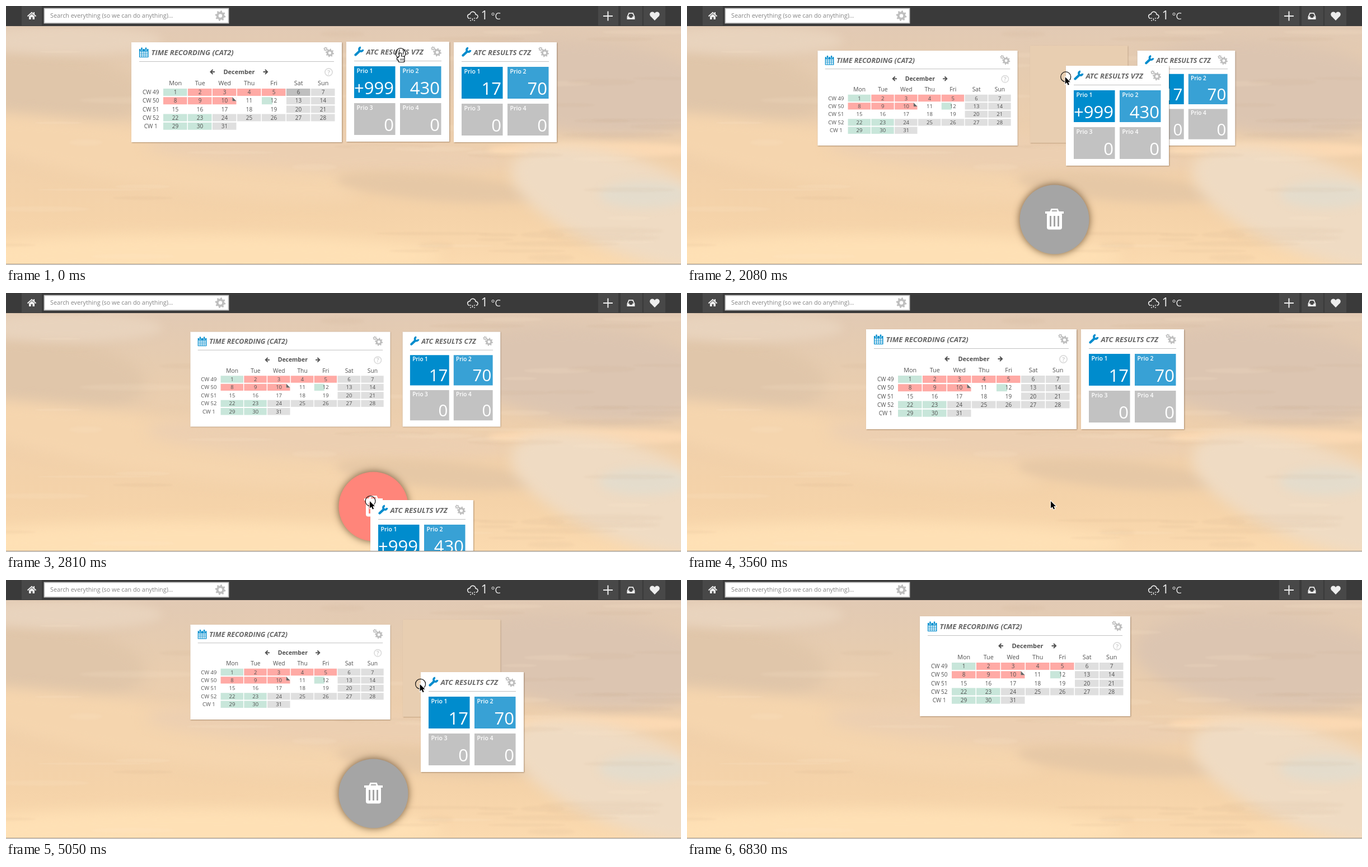
Write an HTML page with a canvas that moves like this. It is 1206 by 464 pixels and loops after 7920 ms.

```html
<!DOCTYPE html>
<html lang="en">
<head>
<meta charset="utf-8">
<title>Dashboard</title>
<style>
  html, body { margin: 0; width: 100%; height: 100%; overflow: hidden; background: #f3d2ac; }
  canvas { display: block; }
</style>
</head>
<body>
<canvas id="stage" width="1206" height="464"></canvas>
<script>
const W = 1206, H = 464, LOOP = 7920, BAR = 36, FLOOR = 462;
const CARD_Y = 65, CARD_H = 179, GAP = 8, SHRINK = 0.95;
const BLUE = '#008ccd', GREY = '#c2c2c2', LIGHT = '#eeeeee', INK = '#505050', PANEL = '#484848';
const screen = document.getElementById('stage').getContext('2d');
const backdrop = document.createElement('canvas');
backdrop.width = W;
backdrop.height = H;
let c = backdrop.getContext('2d');

// ---------- drawing helpers ----------
const times = (n, fn) => { for (let i = 0; i < n; i++) fn(i); };

function box(x, y, w, h, color, r = 0) {
  c.fillStyle = color;
  c.beginPath();
  c.roundRect(x, y, w, h, r);
  c.fill();
}

function label(str, x, y, size, color, style = '400', align = 'left') {
  c.font = `${style} ${size}px "Open Sans", "Noto Sans", sans-serif`;
  c.textAlign = align;
  c.fillStyle = color;
  c.fillText(str, x, y);
}

function trace(pts, close) {
  c.beginPath();
  for (let i = 0; i < pts.length; i += 2) c.lineTo(pts[i], pts[i + 1]);
  if (close) c.closePath();
}

function poly(color, pts) {
  trace(pts, true);
  c.fillStyle = color;
  c.fill();
}

function outline(color, width) {
  c.strokeStyle = color;
  c.lineWidth = width;
  c.stroke();
}

function line(color, width, pts) {
  trace(pts);
  outline(color, width);
}

function arc(x, y, r, from = 0, to = 7) {
  c.beginPath();
  c.arc(x, y, r, from, to);
}

function disc(x, y, r, color) {
  arc(x, y, r);
  c.fillStyle = color;
  c.fill();
}

function ring(x, y, r, color, width) {
  arc(x, y, r);
  outline(color, width);
}

function gear(x, y, r, teeth) {
  const pts = [];
  times(teeth * 4, i => {
    const a = (i + 0.5) / (teeth * 4) * Math.PI * 2;
    const d = i % 4 < 2 ? r : r * 0.74;
    pts.push(x + d * Math.cos(a), y + d * Math.sin(a));
  });
  poly('#bfbfbf', pts);
  disc(x, y, r * 0.34, '#ffffff');
}

function shadowed(color, blur, offset, draw) {
  c.save();
  c.shadowColor = color;
  c.shadowBlur = blur;
  c.shadowOffsetX = c.shadowOffsetY = offset;
  draw();
  c.restore();
}

// ---------- backdrop ----------
let seed = 7;
const random = () => (seed = seed * 16807 % 2147483647) / 2147483647;

function puff(color, x, y, rx, ry, tilt = 0) {
  c.filter = `blur(${Math.min(12, ry / 3)}px)`;
  c.beginPath();
  c.ellipse(x, y, rx, ry, tilt, 0, 7);
  c.fillStyle = color;
  c.fill();
  c.filter = 'none';
}

function paintSky() {
  const g = c.createLinearGradient(0, BAR, 0, FLOOR);
  const tones = ['#e2cab4', '#e6ccb0', '#ebceae', '#f2d1aa', '#f5d3a9', '#fbdaaf'];
  tones.forEach((tone, i) => g.addColorStop(i / (tones.length - 1), tone));
  box(0, 0, W, H, g);
  puff('#e0c6aa', 80, 145, 170, 65, 0.12);
  puff('#e8d3bd', 110, 62, 170, 26);
  puff('#f5d5ae', 260, 272, 380, 50, 0.16);
  puff('#eccfb1', 580, 262, 330, 36, 0.05);
  puff('#dcc5b1', 1040, 145, 240, 85, 0.1);
  puff('#fbd9b3', 1050, 258, 190, 14);
  puff('#e6c8a6', 770, 325, 180, 24, 0.08);
  puff('#efdbc3', 1120, 362, 230, 85, 0.35);
  puff('#e4dccc', 1140, 338, 80, 24);
  puff('#fee0b5', 330, 448, 450, 38);
  times(60, i => puff(i % 2 ? 'rgba(255,236,208,.15)' : 'rgba(200,160,130,.09)',
    random() * W, BAR + random() * (FLOOR - BAR), 30 + random() * 80, 2 + random() * 4));
}

function paintBar() {
  box(0, 0, W, BAR, '#3a3a3a');
  [28, 1058, 1098, 1139].forEach((x, i) => box(x, 0, i < 2 ? 36 : 39, 35, PANEL));

  // home
  line(LIGHT, 1.8, [38.5, 18.5, 46, 11.8, 53.5, 18.5]);
  poly(LIGHT, [41, 18.5, 46, 14.2, 51, 18.5, 51, 24, 41, 24]);
  box(44.7, 20, 2.8, 4, PANEL);
  box(49, 11, 2, 4, LIGHT);

  // search
  box(68, 4, 329, 27, '#ffffff');
  c.strokeStyle = '#c8c8c8';
  c.strokeRect(68.5, 4.5, 329, 26);
  label('Search everything (so we can do anything)...', 79, 21, 10.8, '#858585');
  gear(383, 17.5, 9.5, 8);

  // weather
  arc(828.5, 18.5, 3.8, 1.6, 4.5);
  c.arc(834, 15.5, 5.2, 3.3, 5.9);
  c.arc(839.5, 18.8, 3.5, 4.6, 7.8);
  outline(LIGHT, 1.6);
  times(6, i => disc(830 + i % 3 * 3.5, 22 + Math.floor(i / 3) * 3 + i % 2, 0.9, LIGHT));
  label('1', 848.5, 24, 22, LIGHT);
  label('°C', 866.5, 24, 16.5, LIGHT);

  // plus, inbox, heart
  box(1067, 17, 17, 2, LIGHT);
  box(1074.5, 9.5, 2, 17, LIGHT);
  poly(LIGHT, [1112.5, 12, 1120.5, 12, 1123.5, 19, 1123.5, 24, 1109.5, 24, 1109.5, 19]);
  poly(PANEL, [1113.7, 13.8, 1119.3, 13.8, 1121.5, 18.8, 1111.5, 18.8]);
  box(1114, 18, 5, 3, PANEL);
  disc(1154.8, 15, 4.6, LIGHT);
  disc(1163.2, 15, 4.6, LIGHT);
  poly(LIGHT, [1151.3, 18, 1159, 14, 1166.7, 18, 1159, 26]);
}

// ---------- cards (origin at the top left corner) ----------
function cardShell(w, title) {
  shadowed('rgba(70,40,10,.4)', 2, 0.8, () => box(0, 0, w, CARD_H, '#ffffff'));
  label(title, 35.5, 23, 13.1, '#666666', 'italic 700');
  gear(w - 21.5, 19, 7.6, 8);
  gear(w - 29, 12, 3.8, 6);
  box(14, 34, w - 28, 1, '#c0c0c0');
}

function drawWrench() {
  c.lineCap = 'round';
  line(BLUE, 4.4, [16.5, 23.5, 24, 16.5]);
  c.lineCap = 'butt';
  arc(26.3, 13.7, 3.4, 0.1, 4.6);
  outline(BLUE, 3.6);
}

function drawResults({ w, title, counts }) {
  cardShell(w, title);
  drawWrench();
  counts.forEach((n, i) => {
    const x = 14 + i % 2 * 82, y = i < 2 ? 44 : 110;
    box(x, y, 73.5, 57, [BLUE, '#38a1d5', GREY, GREY][i]);
    label('Prio ' + (i + 1), x + 4.5, y + 11.5, 10.5, '#ffffff', '600');
    label(n, x + 71, y + 49.5, 31, '#ffffff', '400', 'right');
  });
}

function drawCalendarIcon() {
  box(14, 12, 16.5, 15, BLUE);
  times(12, i => box(15.2 + i % 4 * 3.7, 16.5 + Math.floor(i / 4) * 3.4, 2.8, 2.5, '#ffffff'));
  [17, 24.5].forEach(x => {
    box(x - 0.5, 10, 4, 5, '#ffffff');
    box(x + 0.3, 9.5, 2.4, 5, BLUE);
  });
}

function drawArrow(x, dir) {
  line(INK, 2, [x + 4.5 * dir, 53, x - 3.5 * dir, 53]);
  line(INK, 2, [x, 49, x + 4 * dir, 53, x, 57]);
}

// g: booked, r: missing, x: off, h: half day, w: open
const MONTH = ['grrrrxx', 'rrrwhxx', 'wwwwwxx', 'ggxxxxx', 'ggx'];
const TINT = { g: '#c8e6da', r: '#ffaaa5', x: '#dfdfdf', h: '#c8e6da' };

function drawTime({ w, title }, hot) {
  cardShell(w, title);
  drawCalendarIcon();
  drawArrow(145.5, -1);
  drawArrow(239, 1);
  label('December', 192.5, 56.5, 11, INK, '700', 'center');
  ring(352.5, 53.5, 6.6, '#dcdcdc', 1.8);
  label('?', 352.5, 57.5, 11, '#d4d4d4', '700', 'center');
  ['Mon', 'Tue', 'Wed', 'Thu', 'Fri', 'Sat', 'Sun'].forEach((d, i) =>
    label(d, 78.7 + i * 44, 77, 10.8, INK, '400', 'center'));
  MONTH.forEach((row, r) => {
    const y = 83 + r * 15.2;
    label('CW ' + (r < 4 ? 49 + r : 1), 34.7, y + 10.2, 10, INK, '400', 'center');
    [...row].forEach((kind, i) => {
      const x = 57 + i * 44, day = r * 7 + i + 1;
      const tint = hot && day === 6 ? '#bfbfbf' : TINT[kind];
      if (tint) box(x, y, kind === 'h' ? 19 : 42.5, 13, tint);
      if (day === 10) {
        box(x + 35.5, y, 7, 7, '#ffffff');
        poly('#666666', [x + 35.5, y, x + 42.5, y + 7, x + 35.5, y + 7]);
      }
      label(day, x + 21.5, y + 10.2, 10, INK, '400', 'center');
    });
  });
}

const TIME = { w: 376, title: 'TIME RECORDING (CAT2)', draw: drawTime };
const V7Z = { w: 184, title: 'ATC RESULTS V7Z', counts: ['+999', '430', '0', '0'], draw: drawResults };
const C7Z = { w: 184, title: 'ATC RESULTS C7Z', counts: ['17', '70', '0', '0'], draw: drawResults };

function placeCard(card, x, y, scale = 1, hot = false) {
  c.save();
  c.translate(x + card.w / 2, y + CARD_H / 2);
  c.scale(scale, scale);
  c.translate(-card.w / 2, -CARD_H / 2);
  card.draw(card, hot);
  c.restore();
}

function drawSlot(mid) {
  shadowed('rgba(110,75,40,.4)', 2, 0.8, () => box(mid - 87, 71, 174.5, 174, '#e8ceb1'));
}

function drawTrash(over) {
  const x = 656.5, y = 382.5, color = over ? '#ff857a' : '#a5a5a5';
  shadowed('rgba(70,45,20,.75)', 14, 0, () => disc(x, y, 62, color));
  line('#ffffff', 3, [x - 7, 369, x - 5, 364.5, x + 5, 364.5, x + 7, 369]);
  box(x - 16.5, 368, 33, 4, '#ffffff');
  box(x - 13.5, 370, 27, 30.5, '#ffffff', 4);
  [-7, 0, 7].forEach(d => box(x + d - 1.5, 376, 3, 19, color));
}

function drawArrowhead() {
  const shape = [0, 0, 0, 12.5, 2.9, 9.9, 5, 14.6, 7.1, 13.6, 5.1, 9.1, 9, 9.1];
  trace(shape, true);
  outline('#ffffff', 2);
  poly('#000000', shape);
}

function drawHand() {
  [['#111111', 0.6], ['#ffffff', -0.6]].forEach(([color, grow]) => {
    const part = (x, y, w, h) => box(x - grow, y - grow, w + 2 * grow, h + 2 * grow, color, 2);
    part(-1.5, -1, 4, 12);
    part(-5.5, 7, 4.5, 5);
    part(-3, 5, 11, 10.5);
  });
  [1, 3.5, 6].forEach(d => line('#111111', 0.9, [d, 9, d, 13]));
}

function drawPointer({ x, y }, pressed, hand) {
  c.save();
  c.translate(x, y);
  if (pressed) ring(1, -0.3, 9, '#111111', 1.2);
  (hand ? drawHand : drawArrowhead)();
  c.restore();
}

// ---------- motion ----------
const START = { x: 704, y: 85 }, GRAB_1 = { x: 681, y: 77 }, DROP_1 = { x: 650, y: 373 };
const GRAB_2 = { x: 775, y: 83 }, DROP_2 = { x: 676, y: 373 };

// the picture advances in n even jumps, the first at a and the last at b
const jumps = (t, a, b, n) => t < a ? 0 : Math.min(n, 1 + Math.floor((t - a + 0.5) / ((b - a) / (n - 1))));
const smooth = u => u * u * (3 - 2 * u);
const mix = (a, b, k) => a + (b - a) * k;
const between = (p, q, u) => ({ x: mix(p.x, q.x, smooth(u)), y: mix(p.y, q.y, smooth(u)) });

function stateAt(t) {
  if (t < 1930) {
    return { cards: [TIME, V7Z, C7Z], pointer: between(START, GRAB_1, jumps(t, 150, 890, 6) / 6),
             pressed: t < 150 || t >= 1640, hand: t < 150 };
  }
  if (t < 3560) return drag([TIME, V7Z, C7Z], V7Z, GRAB_1, DROP_1, jumps(t, 1930, 2810, 7));
  if (t < 4750) {
    const n = jumps(t, 3560, 4600, 8);
    return { cards: [TIME, C7Z], pointer: between(DROP_1, GRAB_2, (n - 1) / 7), pressed: n === 8 };
  }
  if (t < 6530) return drag([TIME, C7Z], C7Z, GRAB_2, DROP_2, jumps(t, 4750, 5640, 7));
  return { cards: [TIME], pointer: t < 6830 ? DROP_2 : null };
}

// the held card trails a little behind the pointer
function drag(cards, held, from, to, n) {
  const u = (n / 7) ** 1.07, over = n >= 6;
  const pointer = between(from, to, u);
  const late = smooth(Math.max(0, u - 0.075 * (1.1 - u)));
  return {
    cards: over ? cards.filter(card => card !== held) : cards,
    held, over, pointer, pressed: true,
    heldX: Math.round(pointer.x + 1.4), heldY: Math.round(mix(from.y, to.y - 2, late))
  };
}

function drawCards({ cards, held, over, pointer }, hot) {
  const total = cards.reduce((sum, card) => sum + card.w + GAP, -GAP);
  let x = 604 - total / 2;
  for (const card of cards) {
    if (card === held) drawSlot(x + card.w / 2);
    else if (held) placeCard(card, x, CARD_Y + (over ? 0 : 10.5), SHRINK);
    else {
      const lifted = card !== TIME && pointer && pointer.x > x && pointer.x < x + card.w &&
        pointer.y > CARD_Y && pointer.y < CARD_Y + CARD_H;
      placeCard(card, x, CARD_Y - (lifted ? 1 : 0), 1, hot);
    }
    x += card.w + GAP;
  }
}

function render(t) {
  const s = stateAt(t);
  c.drawImage(backdrop, 0, 0);
  drawCards(s, t < 150);
  if (s.held) {
    drawTrash(s.over);
    placeCard(s.held, s.heldX, s.heldY);
  }
  if (s.pointer) drawPointer(s.pointer, s.pressed, s.hand);
  box(0, FLOOR, W, 1, '#8d857c');
  box(0, FLOOR + 1, W, 1, '#f4f2ef');
}

paintSky();
paintBar();
c = screen;

const began = performance.now();
function tick() {
  render((performance.now() - began) % LOOP);
  requestAnimationFrame(tick);
}
tick();
</script>
</body>
</html>
```
